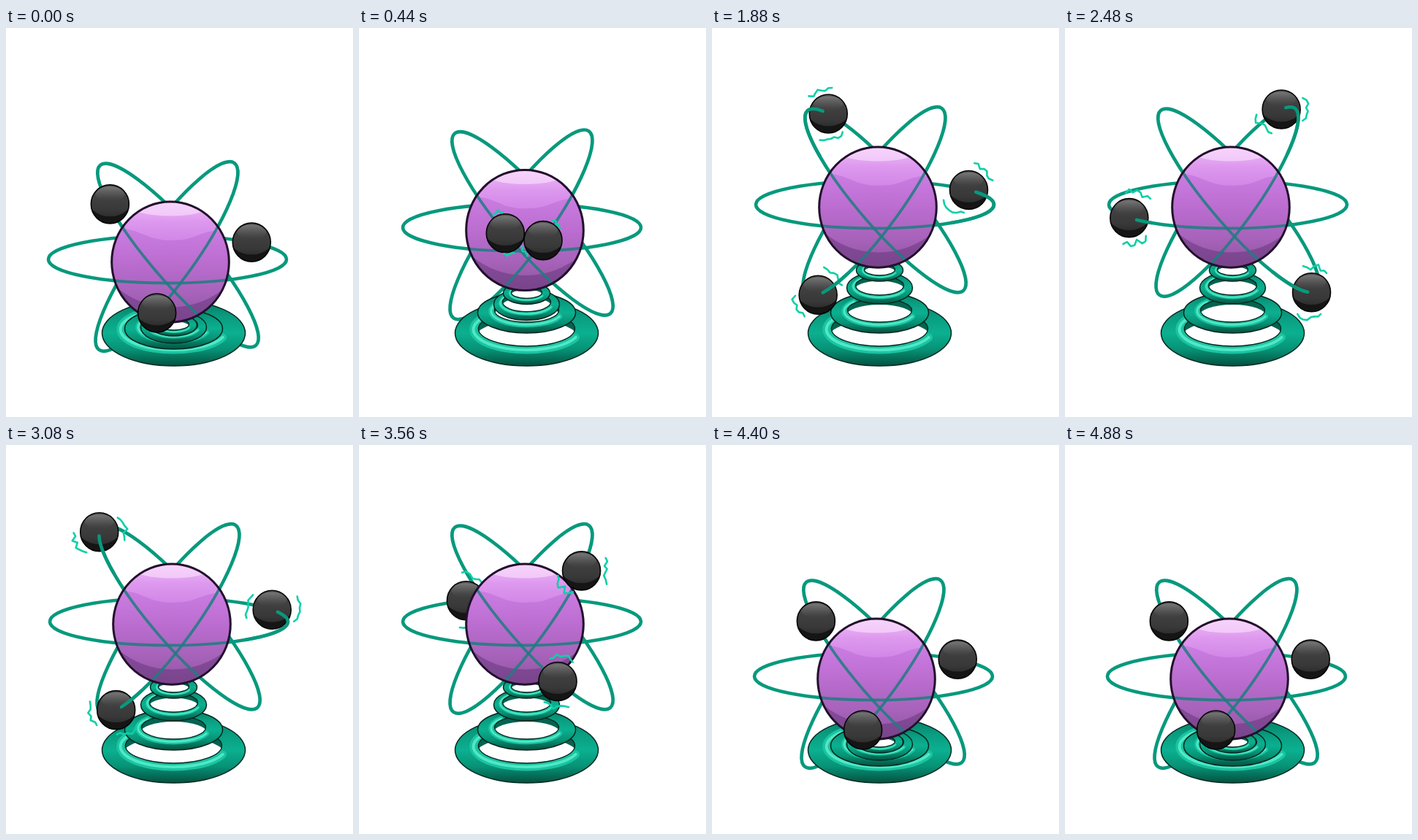
Recreate the animation shown at these times as an HTML page with a canvas. Size 475 by 533 pixels, loop 5510 ms.

```html
<!DOCTYPE html>
<html>
<head>
<meta charset="utf-8">
<title>Atom on a spring</title>
<style>
html, body { margin: 0; width: 100%; height: 100%; overflow: hidden; background: #fff; }
canvas { display: block; }
</style>
</head>
<body>
<canvas id="stage" width="475" height="533"></canvas>
<script>
const c = document.getElementById('stage').getContext('2d');
const LOOP = 5510, STEP = 120, FIRST = 80, LIFT = 75;
const GREEN = '#07997d', LINE = 4.6, RAD = Math.PI / 180;

// Orbits at full height. Ball angles (degrees) follow the steps in KEYS;
// 0..180 is the near half.
const KEYS = [0, 4, 9, 10, 16, 26, 30, 34, 37];
const orbits = [
  { x: 223, y: 242, a: 163, b: 32.5, tilt: 0,
    ball: [-46, -88, -147, -160, -398, -750, -838, -783, -766] },
  { x: 222, y: 238, a: 158, b: 37, tilt: -54.1,
    ball: [117, 90, 0, -16, -200, -565, -670, -620, -603] },
  { x: 237.5, y: 236.5, a: 163, b: 37, tilt: 49.2,
    ball: [135, 95, 18, 7, -150, -550, -663, -616, -585] }
];

// Two spark directions per ball, cycling through three poses.
const sparkDirs = [
  [[-70, 75], [0, 140], [-80, 95]],
  [[-50, 130], [-50, 150], [-110, 80]],
  [[0, 190], [170, 60], [-10, 150]]
];

// cy, rx, ry, hole rx, hole ry, hole offset
const rings = [
  [418, 98, 45, 66, 24, -6],
  [390, 67, 28, 44, 16, -3],
  [356, 45, 22, 33, 13, -3],
  [332, 32, 15, 21, 8, -1]
];

function track(values, k) {
  let i = 1;
  while (i < KEYS.length - 1 && k > KEYS[i]) i++;
  const f = Math.min(1, (k - KEYS[i - 1]) / (KEYS[i] - KEYS[i - 1]));
  return values[i - 1] + (values[i] - values[i - 1]) * f;
}

function rise(k) {
  return Math.max(0, Math.min(LIFT, 10.9 * k, 10.9 * (37 - k)));
}

function noise(n) {
  const v = Math.sin(n * 127.1) * 43758.5453;
  return v - Math.floor(v);
}

function shade(y0, y1, ...colors) {
  const g = c.createLinearGradient(0, y0, 0, y1);
  colors.forEach((col, i) => g.addColorStop(i / (colors.length - 1), col));
  return g;
}

function oval(x, y, rx, ry) {
  c.moveTo(x + rx, y);
  c.ellipse(x, y, rx, ry, 0, 0, 2 * Math.PI);
}

function fillOval(x, y, rx, ry, paint) {
  c.beginPath();
  oval(x, y, rx, ry);
  c.fillStyle = paint;
  c.fill();
}

function strokeOval(x, y, rx, ry, color, width) {
  c.beginPath();
  oval(x, y, rx, ry);
  c.strokeStyle = color;
  c.lineWidth = width;
  c.stroke();
}

function orbitArc(o, dx, dy, from, to, color, width) {
  c.beginPath();
  c.ellipse(o.x + dx, o.y + dy, o.a, o.b, o.tilt * RAD, from * RAD, to * RAD, from > to);
  c.strokeStyle = color;
  c.lineWidth = width;
  c.stroke();
}

function ballSpot(o, deg, dy) {
  const u = o.a * Math.cos(deg * RAD), v = o.b * Math.sin(deg * RAD);
  const ct = Math.cos(o.tilt * RAD), st = Math.sin(o.tilt * RAD);
  return [o.x + u * ct - v * st, o.y + dy + u * st + v * ct];
}

function drawBall(x, y) {
  c.save();
  fillOval(x, y, 26, 26.5, shade(y - 26, y + 26, '#555', '#404040', '#383838', '#222'));
  c.clip();
  fillOval(x, y - 14, 20, 10, shade(y - 24, y - 4, '#777', 'rgba(80,80,80,0)'));
  c.beginPath();
  c.rect(x - 30, y - 30, 60, 60);
  oval(x, y - 12, 33, 29);
  c.fillStyle = '#151515';
  c.fill('evenodd');
  c.restore();
  strokeOval(x, y, 26, 26.5, '#050505', 1.6);
}

function drawSpark(x, y, deg, seed, size) {
  c.beginPath();
  for (let i = 0; i < 8; i++) {
    const a = (deg + (i - 3.5) * 8 * size) * RAD;
    const r = 25 + size * (6 + 9 * noise(seed + i));
    c.lineTo(x + r * Math.cos(a), y + r * Math.sin(a));
  }
  c.strokeStyle = '#0fcfa8';
  c.lineWidth = 2.6;
  c.stroke();
}

function drawRing([cy, rx, ry, hx, hy, ho], lift) {
  const x = 229.5, y = cy + lift, hole = y + ho;
  fillOval(x, y, rx, ry, shade(y - ry, y + ry, '#067a62', '#0a9c80', '#0bb090', '#079276', '#04513f'));
  // light along the rim of the hole
  for (const [color, width] of [['#1cc3a0', .11], ['#4fe8c6', .04]]) {
    c.beginPath();
    c.ellipse(x, hole + 1, hx + rx * .07, hy + ry * .09, 0, .4, 3.9);
    c.strokeStyle = color;
    c.lineWidth = rx * width;
    c.stroke();
  }
  // hole: dark far wall, white floor
  c.save();
  fillOval(x, hole, hx, hy, '#056350');
  c.clip();
  fillOval(x, hole + hy * .5, hx * 1.06, hy, '#fff');
  c.restore();
  strokeOval(x, hole, hx, hy, '#03261e', 1.3);
  strokeOval(x, y, rx, ry, '#03261e', 1.5);
}

function drawSphere(dx, dy) {
  const x = 227 + dx, y = 245.6 + dy;
  c.save();
  fillOval(x, y, 80.3, 82.6,
    shade(y - 82, y + 82, '#d68fea', '#c97be0', '#bb6dd0', '#a863bb', '#8f559f'));
  c.clip();
  // glossy cap
  c.beginPath();
  c.moveTo(x - 85, y - 90);
  c.lineTo(x - 68, y - 46);
  c.bezierCurveTo(x - 38, y - 44, x - 30, y - 27, x + 8, y - 30);
  c.bezierCurveTo(x + 35, y - 30, x + 45, y - 46, x + 72, y - 42);
  c.lineTo(x + 85, y - 90);
  c.fillStyle = shade(y - 82, y - 28, '#eebcf8', '#dd98ee', '#d086e6');
  c.fill();
  fillOval(x, y - 77, 54, 14, 'rgba(255,232,255,.55)');
  // lower shadow
  c.beginPath();
  c.rect(x - 90, y - 90, 180, 180);
  oval(x + 1, y - 33, 106, 95);
  c.fillStyle = 'rgba(100,52,122,.5)';
  c.fill('evenodd');
  for (const o of orbits) orbitArc(o, dx, dy, 0, 180, 'rgba(30,125,128,.85)', 3.8);
  c.restore();
  strokeOval(x, y, 80.3, 82.6, '#22102b', 3);
}

function draw(k) {
  const s = rise(k), dy = LIFT - s, dx = s ? 0 : -2;
  const balls = orbits.map((o, i) => {
    const deg = track(o.ball, k);
    const [x, y] = ballSpot(o, deg, dy);
    // normalised to -90..270 so the near half is 0..180
    const phase = ((deg + 90) % 360 + 360) % 360 - 90;
    return { o, i, x, y, phase, near: phase >= 0 && phase <= 180,
             edge: Math.cos(deg * RAD) };
  });
  const showBall = b => {
    drawBall(b.x, b.y);
    if (k < 3 || k > 34) return;
    const size = s < 60 ? .5 : 1;
    sparkDirs[k % 3][b.i].forEach((d, n) =>
      drawSpark(b.x, b.y, d, k * 31 + b.i * 11 + n * 5, size));
  };

  c.fillStyle = '#fff';
  c.fillRect(0, 0, 475, 533);
  c.lineJoin = c.lineCap = 'round';
  for (const o of orbits) orbitArc(o, dx, dy, 0, 360, GREEN, LINE);
  drawRing(rings[0], 0);
  drawRing(rings[1], 22 - Math.min(22, s * .55));
  drawRing(rings[2], dy * .72);
  drawRing(rings[3], dy);
  balls.filter(b => !b.near).forEach(showBall);
  drawSphere(dx, dy);
  balls.filter(b => b.near).forEach(showBall);
  // near strand of the orbit passes over a ball at the tip
  for (const b of balls) {
    if (b.edge > .78) orbitArc(b.o, dx, dy, b.phase + 6, 50, GREEN, LINE);
    if (b.edge < -.78) orbitArc(b.o, dx, dy, b.phase - 6, 130, GREEN, LINE);
  }
}

const start = performance.now();
function frame() {
  const t = (performance.now() - start) % LOOP;
  draw(t < FIRST ? 0 : Math.min(41, Math.floor((t - FIRST) / STEP) + 1));
  requestAnimationFrame(frame);
}
frame();
</script>
</body>
</html>
```
